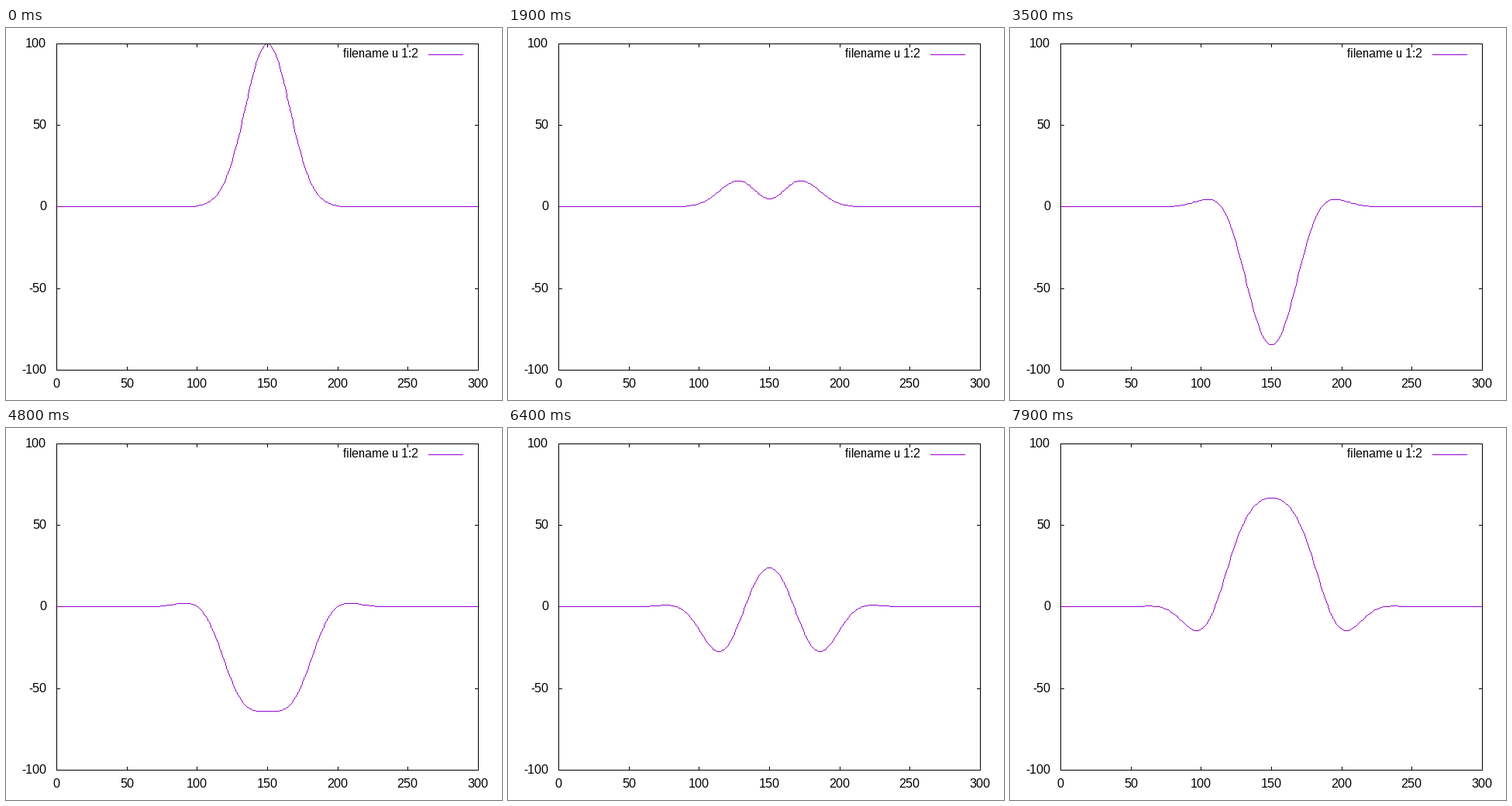
These frames come from a looping animation (640 px wide and 480 px high, 8000 ms). A matplotlib script:

```python
import numpy as np
import matplotlib.pyplot as plt
from matplotlib.animation import FuncAnimation

# Plain hinting on whole pixels gives light, evenly spaced glyphs.
plt.rcParams["text.hinting"] = "default"
plt.rcParams["text.hinting_factor"] = 1

W, H, DPI = 640, 480, 100
LEFT, RIGHT, TOP, BOTTOM = 65, 609, 20, 441
FRAMES, STEP_MS = 80, 100
SPEED2, MASS2 = 0.5, 0.005
PURPLE = "#9400d3"
TEXT = dict(family="Liberation Sans", fontsize=16 * 72 / DPI, color="black",
            va="baseline")

x = np.arange(301)


def simulate():
    """Leapfrog solution of a Klein-Gordon wave that starts at rest."""
    u = 100 * np.exp(-(x - 150.0) ** 2 / 500)
    states = [u, u.copy()]
    while len(states) < FRAMES:
        old, u = states[-2:]
        new = 2 * u - old - MASS2 * u
        new[1:-1] += SPEED2 * (u[2:] - 2 * u[1:-1] + u[:-2])
        new[0] = new[-1] = 0
        states.append(new)
    return states


def to_px(v):
    return LEFT + np.floor(v * (RIGHT - LEFT) / 300 + 0.5)


def to_py(v):
    return BOTTOM - np.floor((v + 100) * (BOTTOM - TOP) / 200 + 0.5)


def trace(u):
    """Pixels of a one-pixel polyline without smoothing."""
    px, py = to_px(x), to_py(u)
    length = np.maximum(np.abs(np.diff(px)), np.abs(np.diff(py)))
    s = np.concatenate([[0], np.cumsum(length)])
    q = np.arange(s[-1] + 1)
    # The offsets keep pixel markers clear of rounding ties.
    return np.rint(np.interp(q, s, px)) + 0.25, np.rint(np.interp(q, s, py)) + 0.75


def bar(x0, y0, x1, y1, color="black", z=3):
    """Solid line covering the pixels from (x0, y0) to (x1, y1)."""
    ax.add_patch(plt.Rectangle((x0, y0), x1 - x0 + 1, y1 - y0 + 1, fc=color,
                               lw=0, antialiased=False, zorder=z))


fig = plt.figure(figsize=(W / DPI, H / DPI), dpi=DPI, facecolor="white")
ax = fig.add_axes([0, 0, 1, 1])
ax.set_xlim(0, W)
ax.set_ylim(H, 0)
ax.axis("off")

# The curve runs over the ticks but under the border.
for y in (TOP, BOTTOM):
    bar(LEFT, y, RIGHT, y)
for edge in (LEFT, RIGHT):
    bar(edge, TOP, edge, BOTTOM)

for v in range(0, 301, 50):
    p = to_px(v)
    bar(p, TOP, p, TOP + 4, z=1)
    bar(p, BOTTOM - 4, p, BOTTOM, z=1)
    ax.text(p, 464, str(v), ha="center", **TEXT)

for v in range(-100, 101, 50):
    p = to_py(v)
    bar(LEFT, p, LEFT + 4, p, z=1)
    bar(RIGHT - 4, p, RIGHT, p, z=1)
    ax.text(52, p + 5, str(v), ha="right", **TEXT)

ax.text(532, 38, "filename u 1:2", ha="right", **TEXT)
bar(545, 34, 589, 34, PURPLE)

curve, = ax.plot([], [], ",", color=PURPLE, zorder=2)
states = simulate()


def update(i):
    curve.set_data(*trace(states[i]))
    return curve,


anim = FuncAnimation(fig, update, frames=FRAMES, interval=STEP_MS,
                     repeat=True, repeat_delay=0, blit=False)
plt.show()
```
